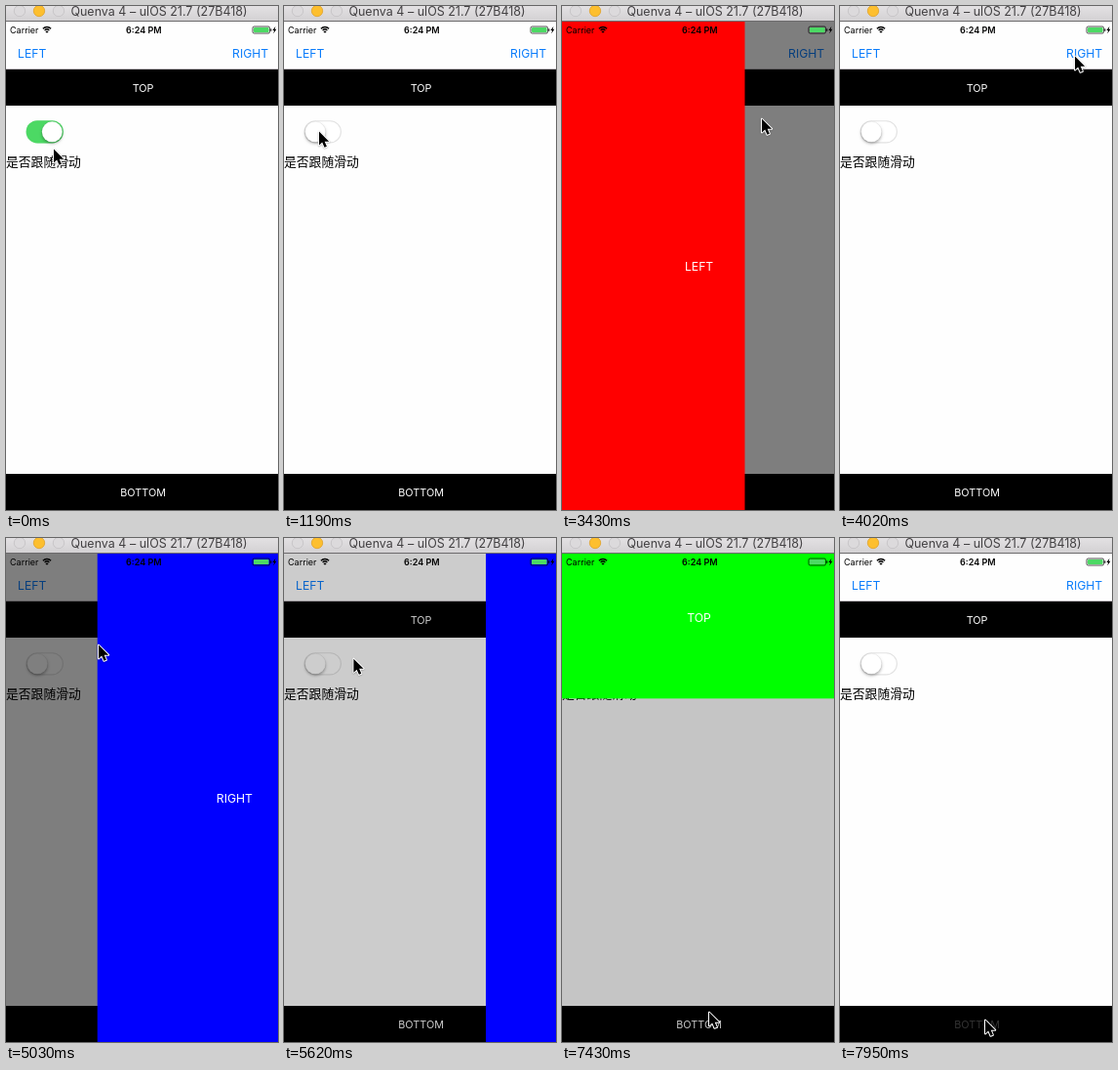
These frames come from a looping animation (279x516 px, 8 s). An HTML page with a canvas:

```html
<!DOCTYPE html>
<html lang="zh">
<head>
<meta charset="utf-8">
<title>Drawer demo</title>
<style>
html, body { margin: 0; width: 100%; height: 100%; overflow: hidden; background: #fff; }
canvas { display: block; width: 279px; height: 516px; }
</style>
</head>
<body>
<canvas id="stage"></canvas>
<script>
const W = 279, H = 516, LOOP = 8000;
const TOP = 16, VIEW_W = 281.25, VIEW_H = 500;
const MID_X = 140.6, MID_Y = 267;
const SANS = 'Inter, Roboto, "Liberation Sans", sans-serif';
const CJK = '"Noto Sans CJK SC", "Noto Sans CJK", sans-serif';
const BLUE = '#0a7cfb';

const canvas = document.getElementById('stage');
const ctx = canvas.getContext('2d');
const ratio = window.devicePixelRatio || 1;
canvas.width = W * ratio;
canvas.height = H * ratio;

// Pointer stops: time, x, y
const path = [
  [0, 48, 145], [60, 48, 145], [400, 30, 116], [600, 35, 127], [1230, 35, 127],
  [1590, 10, 24], [1770, 10, 24], [2100, 24, 42], [2640, 24, 42], [3430, 204, 114],
  [3680, 204, 114], [4000, 240, 50], [4620, 240, 50], [5030, 94, 108], [5260, 62, 126],
  [5480, 62, 126], [6270, 162, 79], [6800, 162, 79], [7200, 150, 484], [7500, 150, 484],
  [7760, 148, 492], [8000, 148, 492]
];

const drawers = [
  { side: 'left', label: 'LEFT', color: '#ff0000', open: 2296, close: 3680 },
  { side: 'right', label: 'RIGHT', color: '#0000ff', open: 4430, close: 5450 },
  { side: 'top', label: 'TOP', color: '#00ff00', open: 6517, close: 7270 }
];

// Touch-down and touch-up of each button
const presses = {
  LEFT: [2190, 2300], RIGHT: [4330, 4440], TOP: [6450, 6520], BOTTOM: [7900, 8000]
};

const clamp = v => Math.max(0, Math.min(1, v));
const mix = (a, b, k) => a + (b - a) * k;
const smooth = v => { v = clamp(v); return v * v * (3 - 2 * v); };
const ramp = (t, start, length) => smooth((t - start) / length);

function pointerAt(t) {
  const i = Math.max(1, path.findIndex(p => p[0] >= t));
  const [t0, x0, y0] = path[i - 1], [t1, x1, y1] = path[i];
  const k = smooth((t - t0) / (t1 - t0));
  return [mix(x0, x1, k), mix(y0, y1, k)];
}

function buttonAlpha(name, t) {
  const [down, up] = presses[name];
  return t < down ? 1 : mix(0.2, 1, clamp((t - up) / 200));
}

function rect(x, y, w, h, color) {
  ctx.fillStyle = color;
  ctx.fillRect(x, y, w, h);
}

function pill(x, y, w, h, r = h / 2) {
  ctx.beginPath();
  ctx.roundRect(x, y, w, h, r);
}

function text(str, x, cy, size, color, { align = 'center', weight = 400, font = SANS, alpha = 1 } = {}) {
  ctx.font = `${weight} ${size}px ${font}`;
  ctx.textAlign = align;
  ctx.globalAlpha = alpha;
  ctx.fillStyle = color;
  ctx.fillText(str, x, cy + size * 0.364);
  ctx.globalAlpha = 1;
}

function drawTitleBar() {
  const g = ctx.createLinearGradient(0, 0, 0, TOP);
  g.addColorStop(0, '#e3e1e3');
  g.addColorStop(1, '#d2d0d2');
  rect(0, 0, W, TOP, g);
  rect(0, 15, W, 1, '#6d6b6d');
  [['#dcdadc', '#c3c1c3'], ['#fdbf2f', '#e0a32a'], ['#dcdadc', '#c3c1c3']].forEach(([fill, edge], i) => {
    ctx.beginPath();
    ctx.arc(14 + 20 * i, 5, 5.7, 0, Math.PI * 2);
    ctx.fillStyle = fill;
    ctx.fill();
    ctx.strokeStyle = edge;
    ctx.lineWidth = 0.8;
    ctx.stroke();
  });
  text('Quenva 4 – ulOS 21.7 (27B418)', 157, 5.5, 12.5, '#434143');
}

function drawStatusBar() {
  text('Carrier', 4, 24.5, 9, '#000', { align: 'left' });
  text('6:24 PM', 141.3, 24.5, 9, '#000', { weight: 600 });

  ctx.strokeStyle = '#000';
  ctx.lineWidth = 1.3;
  const a = -Math.PI / 2;
  for (const r of [3.4, 5.9]) {
    ctx.beginPath();
    ctx.arc(42, 27.4, r, a - 0.78, a + 0.78);
    ctx.stroke();
  }
  ctx.beginPath();
  ctx.moveTo(42, 27.8);
  ctx.arc(42, 27.8, 2.2, a - 0.78, a + 0.78);
  ctx.fillStyle = '#000';
  ctx.fill();

  pill(253, 21, 17.6, 7, 1.6);
  ctx.lineWidth = 0.7;
  ctx.stroke();
  pill(254, 22, 15.6, 5, 0.8);
  ctx.fillStyle = '#4cd964';
  ctx.fill();
  rect(271.3, 23.3, 1, 2.5, '#000');
  ctx.beginPath();
  [[276.4, 20.8], [273.4, 25], [275, 25], [274.3, 28.2], [277.4, 23.8], [275.7, 23.8]]
    .forEach(p => ctx.lineTo(...p));
  ctx.fill();
}

function drawSwitch(t) {
  const x = 20.6, y = 117.2, w = 38.3, h = 23.2;
  const off = ramp(t, 920, 250);
  const stretch = 4.5 * ramp(t, 840, 80) * (1 - ramp(t, 1000, 170));

  pill(x + 0.5, y + 0.5, w - 1, h - 1);
  ctx.fillStyle = '#fff';
  ctx.fill();
  ctx.strokeStyle = '#e2e2e2';
  ctx.lineWidth = 1.1;
  ctx.stroke();
  ctx.globalAlpha = 1 - off;
  pill(x, y, w, h);
  ctx.fillStyle = '#4cd964';
  ctx.fill();
  ctx.globalAlpha = 1;

  const d = 21;
  const kx = mix(x + w - 1.1 - d - stretch, x + 1.1, off);
  ctx.save();
  ctx.shadowColor = 'rgba(0,0,0,0.32)';
  ctx.shadowBlur = 3 * ratio;
  ctx.shadowOffsetY = 1.8 * ratio;
  pill(kx, y + 1.1, d + stretch, d);
  ctx.fillStyle = '#fff';
  ctx.fill();
  ctx.restore();
  ctx.strokeStyle = 'rgba(0,0,0,0.1)';
  ctx.lineWidth = 0.5;
  ctx.stroke();
}

function drawPage(t) {
  rect(0, TOP, W, VIEW_H, '#fefefe');
  rect(0, 64, W, 1, '#c4bfc4');
  text('LEFT', 12, 48.5, 12.2, BLUE, { align: 'left', alpha: buttonAlpha('LEFT', t) });
  text('RIGHT', 269.2, 48.5, 12.2, BLUE, { align: 'right', alpha: buttonAlpha('RIGHT', t) });

  rect(0, 65, W, 37, '#000');
  text('TOP', MID_X, 84, 10.8, '#fff', { alpha: buttonAlpha('TOP', t) });
  drawSwitch(t);
  text('是否跟随滑动', 0, 159.4, 12.8, '#000', { align: 'left', font: CJK });

  rect(0, 479, W, 37, '#000');
  text('BOTTOM', MID_X, 498.5, 10.8, '#fff', { alpha: buttonAlpha('BOTTOM', t) });
}

function drawDrawer({ side, label, color, open, close }, t) {
  const k = ramp(t, open, 300) - ramp(t, close, 300);
  if (k <= 0) return;
  rect(0, TOP, W, VIEW_H, `rgba(0,0,0,${k / 2})`);

  // A drawer covers two thirds of the view; its label keeps the full view's centre
  const w = VIEW_W * 2 / 3, h = VIEW_H * 2 / 3;
  let x = 0, y = TOP, dw = w, dh = VIEW_H;
  if (side === 'left') x = w * (k - 1);
  if (side === 'right') x = VIEW_W - w * k;
  if (side === 'top') { y = TOP + h * (k - 1); dw = VIEW_W; dh = h; }

  ctx.save();
  ctx.beginPath();
  ctx.rect(0, TOP, W, VIEW_H);
  ctx.clip();
  rect(x, y, dw, dh, color);
  text(label, x + MID_X, y + MID_Y - TOP, 12.2, '#fff');
  ctx.restore();
}

function drawPointer(t) {
  const [x, y] = pointerAt(t);
  ctx.save();
  ctx.translate(x + 1, y + 1.6);
  ctx.beginPath();
  [[0, 0], [0, 14], [3.2, 11], [5.5, 16.2], [7.9, 15.2], [5.7, 10.1], [10.2, 10.1]]
    .forEach(p => ctx.lineTo(...p));
  ctx.closePath();
  ctx.lineJoin = 'round';
  ctx.lineWidth = 2;
  ctx.strokeStyle = '#fff';
  ctx.shadowColor = 'rgba(0,0,0,0.3)';
  ctx.shadowBlur = 1.5 * ratio;
  ctx.shadowOffsetY = 0.6 * ratio;
  ctx.stroke();
  ctx.shadowColor = 'transparent';
  ctx.fillStyle = '#000';
  ctx.fill();
  ctx.restore();
}

function draw(t) {
  ctx.setTransform(ratio, 0, 0, ratio, 0, 0);
  drawPage(t);
  drawers.forEach(d => drawDrawer(d, t));
  drawStatusBar();
  drawTitleBar();
  drawPointer(t);
}

const start = performance.now();
function tick() {
  draw((performance.now() - start) % LOOP);
  requestAnimationFrame(tick);
}
tick();
</script>
</body>
</html>
```
